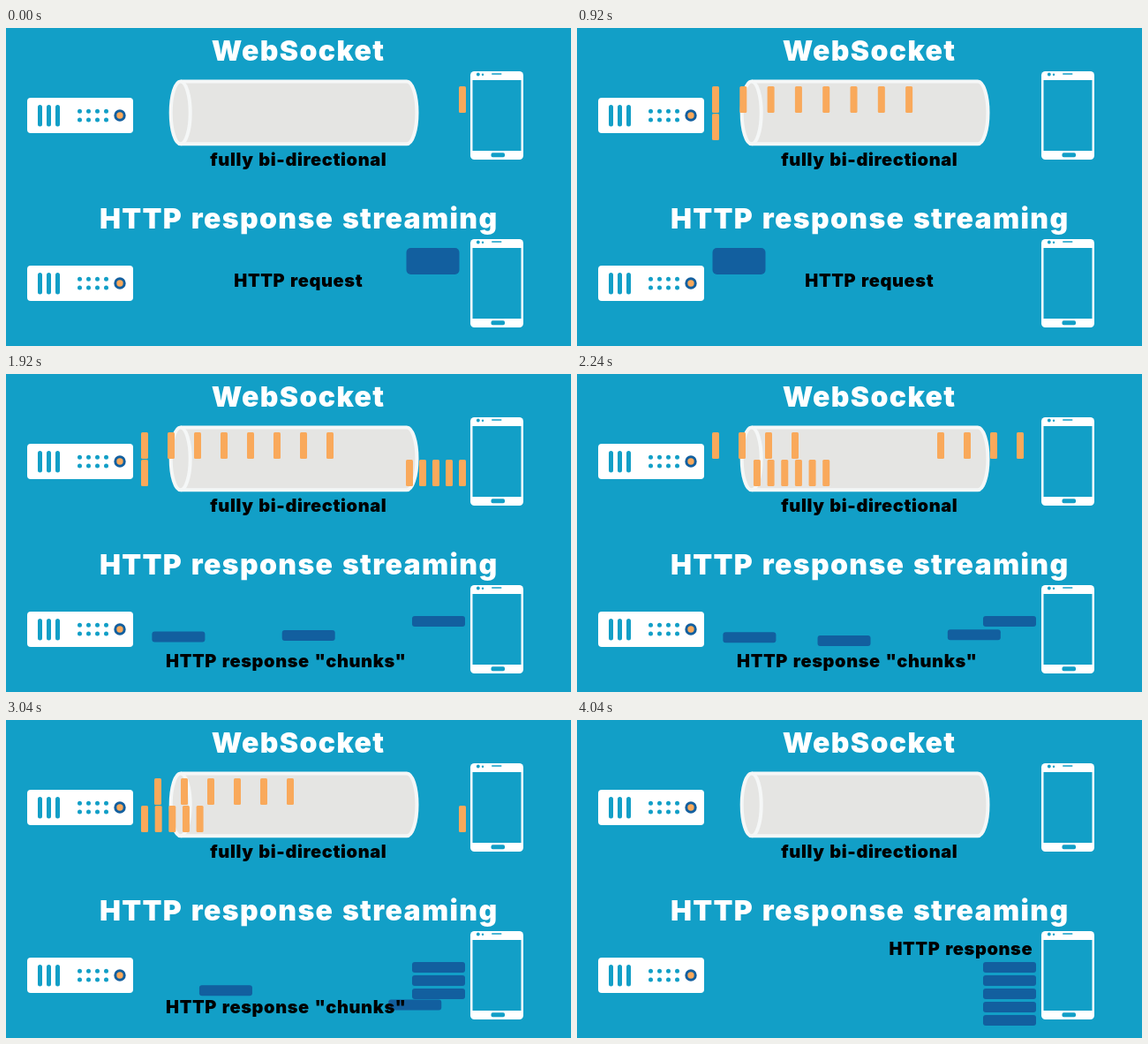
These frames come from a looping animation (640 by 360 pixels, 6720 ms). An HTML page:

```html
<!DOCTYPE html>
<html lang="en">
<head>
<meta charset="utf-8">
<title>WebSocket and HTTP response streaming</title>
<style>
  html, body { margin: 0; width: 100%; height: 100%; overflow: hidden; background: #129fc7; }
  svg { display: block; width: 100%; height: 100%; }
  text {
    font: 900 20px Inter, "Open Sans", sans-serif;
    letter-spacing: .03em;
    word-spacing: .06em;
    text-anchor: middle;
  }
  .title { font-size: 32px; letter-spacing: .042em; fill: #fff; }
</style>
</head>
<body>
<svg viewBox="0 0 640 360">
  <defs>
    <g id="server">
      <rect x="24" y="79" width="120" height="40" rx="4" fill="#fff"/>
      <path d="M38.5 89.5v19.5M48.5 89.5v19.5M58.5 89.5v19.5" stroke="#129fc7" stroke-width="5" stroke-linecap="round"/>
      <path d="M83.5 94.3h30.1M83.5 104h30.1" stroke="#129fc7" stroke-width="5" stroke-linecap="round" stroke-dasharray="0 10"/>
      <circle cx="129" cy="99" r="5.2" fill="#f9a95b" stroke="#125f9f" stroke-width="3"/>
    </g>
    <g id="phone">
      <rect x="526" y="49" width="60" height="100" rx="4.5" fill="#fff"/>
      <g fill="#129fc7">
        <rect x="528.5" y="59" width="55" height="80"/>
        <circle cx="534.8" cy="52.5" r="1.9"/>
        <circle cx="540" cy="52.7" r="1.2"/>
        <rect x="550" y="51.2" width="11.5" height="1.6" rx=".8"/>
        <rect x="549.5" y="141.2" width="15.5" height="5" rx="1.8"/>
      </g>
    </g>
  </defs>

  <rect width="640" height="360" fill="#129fc7"/>
  <use href="#server"/>
  <use href="#server" y="190"/>
  <use href="#phone"/>
  <use href="#phone" y="190"/>

  <g fill="#e5e5e3" stroke="#f5f7f7" stroke-width="4">
    <path d="M198 60.5H454A11.5 35.4 0 0 1 454 131.3H198"/>
    <ellipse cx="197.7" cy="95.9" rx="11" ry="35.4"/>
  </g>

  <g id="movers"></g>

  <text class="title" x="331" y="37">WebSocket</text>
  <text class="title" x="331.7" y="227">HTTP response streaming</text>
  <text x="331.3" y="156">fully bi-directional</text>
  <text class="label" x="331.3" y="293">HTTP request</text>
  <text class="label" x="317.3" y="332">HTTP response "chunks"</text>
  <text class="label" x="434.8" y="266">HTTP response</text>
</svg>
<script>
const LOOP = 6720, STEP = 40;
const ORANGE = '#f9a95b', BLUE = '#125f9f';
const layer = document.getElementById('movers');
const labels = [...document.querySelectorAll('.label')];
const labelTimes = [0, 960, 3800, LOOP];
const movers = [];

// A rounded box that travels in a straight line, visible from start to end.
function addMover(size, fill, from, to, start, duration, end = start + duration) {
  const [width, height, rx] = size;
  const el = document.createElementNS('http://www.w3.org/2000/svg', 'rect');
  Object.entries({ width, height, rx, fill }).forEach(([k, v]) => el.setAttribute(k, v));
  layer.append(el);
  movers.push({ el, from, to, start, duration, end });
}

function addBars(count, gap, start, duration, from, to) {
  for (let i = 0; i < count; i++)
    addMover([8, 30, 1.5], ORANGE, from, to, start + i * gap, duration);
}

for (const [start, duration] of [[0, 920], [960, 960], [1960, 960]])
  addBars(8, 80, start, duration, [513, 66], [153, 66]);
for (const [start, duration] of [[920, 960], [1920, 920], [2880, 920]])
  addBars(6, 40, start, duration, [153, 97], [513, 97]);

addMover([60, 30, 5], BLUE, [453.5, 249], [153.5, 249], 0, 920);
[960, 1440, 1880, 2200, 2840].forEach((start, i) =>
  addMover([60, 12, 3], BLUE, [152, 291], [460, 274 + 15 * i], start, 920, LOOP));

const show = (el, on) => { el.style.visibility = on ? 'visible' : 'hidden'; };

function draw(now) {
  const t = Math.floor((now % LOOP) / STEP) * STEP;
  for (const { el, from, to, start, duration, end } of movers) {
    const p = Math.min(1, Math.max(0, (t - start) / duration));
    show(el, t >= start && t <= end);
    el.setAttribute('x', from[0] + (to[0] - from[0]) * p);
    el.setAttribute('y', from[1] + (to[1] - from[1]) * p);
  }
  labels.forEach((el, i) => show(el, t >= labelTimes[i] && t < labelTimes[i + 1]));
}

const origin = performance.now();
function tick() {
  draw(performance.now() - origin);
  requestAnimationFrame(tick);
}
tick();
</script>
</body>
</html>
```
